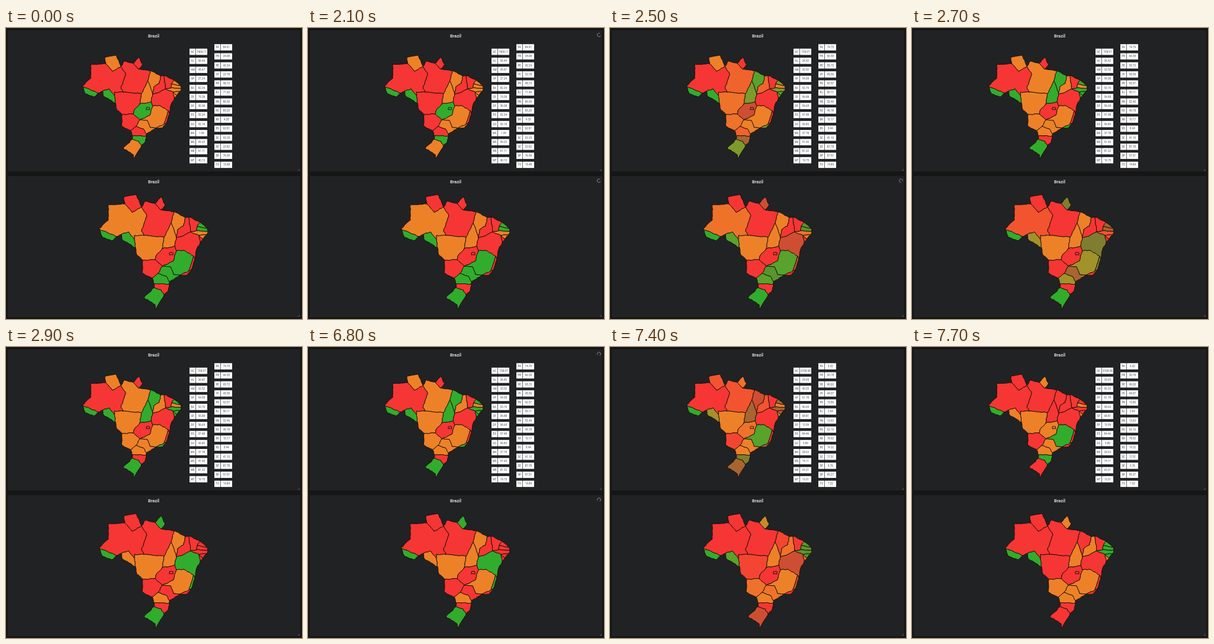
Recreate the animation shown at these times as an HTML page. Size 500 by 491 pixels, loop 8700 ms.

```html
<!DOCTYPE html>
<html lang="en">
<head>
<meta charset="utf-8">
<title>Brazil dashboard</title>
<style>
  html, body { margin: 0; width: 100%; height: 100%; overflow: hidden; background: #161616; }
  svg { display: block; width: 100vw; height: 100vh; }
  text { font-family: Roboto, Arial, sans-serif; text-anchor: middle; }
  .panel { fill: #212224; }
  .title { fill: #d8d9da; font-size: 7.4px; font-weight: 700; }
  .state { stroke: #140c08; stroke-width: .9; stroke-linejoin: round; vector-effect: non-scaling-stroke; }
  .cell { fill: #fff; }
  .value { fill: #444; font-size: 4.5px; }
  .spinner { fill: none; stroke: #8b8c8e; stroke-width: .9; stroke-dasharray: 14 4; }
</style>
</head>
<body>
<svg id="stage" viewBox="0 0 500 491" preserveAspectRatio="none"></svg>
<script>
const LOOP = 8700, STEP = 100, FADE = 500;
const COLORS = { r: [245, 54, 52], o: [237, 129, 40], g: [50, 172, 45] };
const stage = document.getElementById('stage');

// Key points of the map, named by one character each: the outline clockwise, then the inner borders
const points = {
  ...namePoints('ABCDEFGHIJKLMNOPQRSTUVWXYZ0123456789αβγδεζηθι',
    `157,339 173,324 173,298 201,297 199,285 220,281 229,302 235,292 252,296 262,285 269,298 262,307
     284,310 303,320 309,319 328,328 340,338 341,343 339,349 333,356 328,362 322,373 319,390 313,408
     306,417 294,417 276,428 276,432 274,443 267,451 252,475 252,467 233,455 250,438 250,432 247,422
     230,413 231,392 221,383 219,371 197,358 195,348 188,352 179,359 163,353`),
  ...namePoints('abcdefghijklmnopqrstuvwxyzκλμνξπρσφχψω',
    `213,311 238,317 229,343 233,350 217,350 217,357 207,344 267,353 279,329 264,372 253,385 252,391
     285,368 288,354 285,345 300,334 290,340 312,344 299,351 323,335 322,342 326,350 288,376 300,375
     317,385 309,410 283,416 278,403 264,402 283,393 257,414 271,419 262,442 314,395
     276,379 282,379 282,383 276,383`)
};

// code: corners, then the colours of the upper and lower map in the three data sets
const states = {
  AM: ['ABCDaGbcdefgζη', 'rrr', 'orr'],
  AC: ['Aηθι', 'ggg', 'ggg'],
  RR: ['DEFGa', 'oor', 'rrr'],
  PA: ['GHILMihdcb', 'ror', 'rrr'],
  AP: ['IJKL', 'rro', 'rgo'],
  RO: ['ζgfδε', 'ggo', 'gog'],
  MT: ['edhjklβγδf', 'roo', 'oor'],
  MS: ['βlμξ9α', 'ror', 'rro'],
  GO: ['jmwνμlk', 'gro', 'rrr'],
  DF: ['φχψω', 'gro', 'rrr'],
  TO: ['ionmjh', 'ogr', 'ooo'],
  MA: ['MNpqnoi', 'ogr', 'oor'],
  PI: ['NOrsnqp', 'ror', 'rro'],
  CE: ['OPtur', 'rrr', 'rrr'],
  RN: ['PQt', 'ogr', 'grg'],
  PB: ['tQRu', 'ooo', 'grg'],
  PE: ['ruRSv', 'ogr', 'org'],
  AL: ['vST', 'ogr', 'org'],
  SE: ['vTU', 'ogo', 'rro'],
  BA: ['nsrvUVWyxwm', 'rrr', 'rgr'],
  MG: ['wxyσzZκλμν', 'oog', 'goo'],
  ES: ['yWXzσ', 'rrr', 'rgr'],
  RJ: ['zXYZ', 'ogr', 'rrr'],
  SP: ['μλκZ0πξ', 'ooo', 'gro'],
  PR: ['ξπ0189', 'roo', 'goo'],
  SC: ['8123ρ7', 'grg', 'rrr'],
  RS: ['7ρ3456', 'ogr', 'ggr']
};

// start times of the two updates
const firstColumn = [2100, 7000], secondColumn = [2200, 7100], lowerMap = [2400, 7000];
const startsOf = code => code < 'N' ? firstColumn : secondColumn;

function namePoints(names, list) {
  const pairs = list.split(/\s+/).map(pair => pair.split(',').map(Number));
  return Object.fromEntries([...names].map((name, i) => [name, pairs[i]]));
}

function random(a, b) {
  const v = Math.sin(a * 12.9898 + b * 78.233) * 43758.5453;
  return v - Math.floor(v);
}

// A ragged border, the same from both sides
function border(from, to) {
  if (from > to) return border(to, from).reverse();
  const [x0, y0] = points[from], [x1, y1] = points[to];
  const count = Math.max(1, Math.round(Math.hypot(x1 - x0, y1 - y0) / 4));
  return Array.from({ length: count + 1 }, (_, i) => {
    const rough = i % count ? 1.4 : 0, k = i / count;
    return [x0 + (x1 - x0) * k + rough * (random(x0 + i, y1) - .5),
            y0 + (y1 - y0) * k + rough * (random(x1 + i, y0) - .5)];
  });
}

function outline(corners) {
  return [...corners].flatMap((name, i) => border(name, corners[(i + 1) % corners.length])).join(' ');
}

function add(parent, tag, attrs, text = '') {
  const node = document.createElementNS('http://www.w3.org/2000/svg', tag);
  for (const key in attrs) node.setAttribute(key, attrs[key]);
  node.textContent = text;
  return parent.appendChild(node);
}

function addPanel(y, transform, hides) {
  const cy = y + 7.7;
  add(stage, 'rect', { class: 'panel', x: 3, y, width: 494, height: 238 });
  add(stage, 'text', { class: 'title', x: 249.5, y: y + 11.5 }, 'Brazil');
  add(stage, 'path', { d: `M493 ${y + 236.5}h2.5v-2.5`, fill: 'none', stroke: '#666', 'stroke-width': .7 });
  return {
    map: add(stage, 'g', { transform }),
    spinner: add(stage, 'circle', { class: 'spinner', cx: 491.5, cy, r: 2.9 }),
    cy, hides
  };
}

const panels = [
  addPanel(4, 'translate(127 45) scale(.909 .9025) translate(-155 -280)', [2300, 7200]),
  addPanel(250, '', [2600, 7200])
];

const shapes = [];
for (const [code, [corners, upper, lower]] of Object.entries(states)) {
  [[upper, startsOf(code)], [lower, lowerMap]].forEach(([colors, starts], i) => {
    const node = add(panels[i].map, 'polygon', { class: 'state', points: outline(corners) });
    shapes.push({ node, colors, starts });
  });
}

const codes = Object.keys(states).sort();
const cells = codes.map((code, i) => {
  const first = code < 'N', x = first ? 310 : 352;
  const y = first ? 40.1 + i * 15.25 : 32.6 + (i - 13) * 15.25;
  add(stage, 'rect', { class: 'cell', x, y: y - 5.3, width: 10.3, height: 10.6 });
  add(stage, 'text', { class: 'value', x: x + 5.2, y: y + 1.6 }, code);
  add(stage, 'rect', { class: 'cell', x: x + 11, y: y - 5.3, width: 19, height: 10.6 });
  const node = add(stage, 'text', { class: 'value', x: x + 20.5, y: y + 1.6 });
  const scale = i ? 100 : 9999;
  const values = [1, 2, 3].map(set => (scale * random(i + 1, set)).toFixed(2));
  return { node, values, starts: startsOf(code) };
});

function phase(t, starts) {
  return starts.reduce((sum, s) => sum + Math.min(1, Math.max(0, (t - s) / FADE)), 0);
}

function colorAt(colors, p) {
  const from = COLORS[colors[Math.floor(p)]], to = COLORS[colors[Math.ceil(p)]];
  return `rgb(${from.map((v, i) => Math.round(v + (to[i] - v) * (p % 1)))})`;
}

function draw(now) {
  const t = Math.floor(now % LOOP / STEP) * STEP;
  for (const { node, colors, starts } of shapes)
    node.setAttribute('fill', colorAt(colors, phase(t, starts)));
  for (const { node, values, starts } of cells)
    node.textContent = values[Math.ceil(phase(t, starts))];
  for (const { spinner, cy, hides } of panels) {
    const busy = [2100, 6800].some((s, i) => t >= s && t < hides[i]);
    spinner.setAttribute('visibility', busy ? 'visible' : 'hidden');
    spinner.setAttribute('transform', `rotate(${t * .18} 491.5 ${cy})`);
  }
}

const begin = performance.now();
function tick() {
  draw(performance.now() - begin);
  requestAnimationFrame(tick);
}
tick();
</script>
</body>
</html>
```
